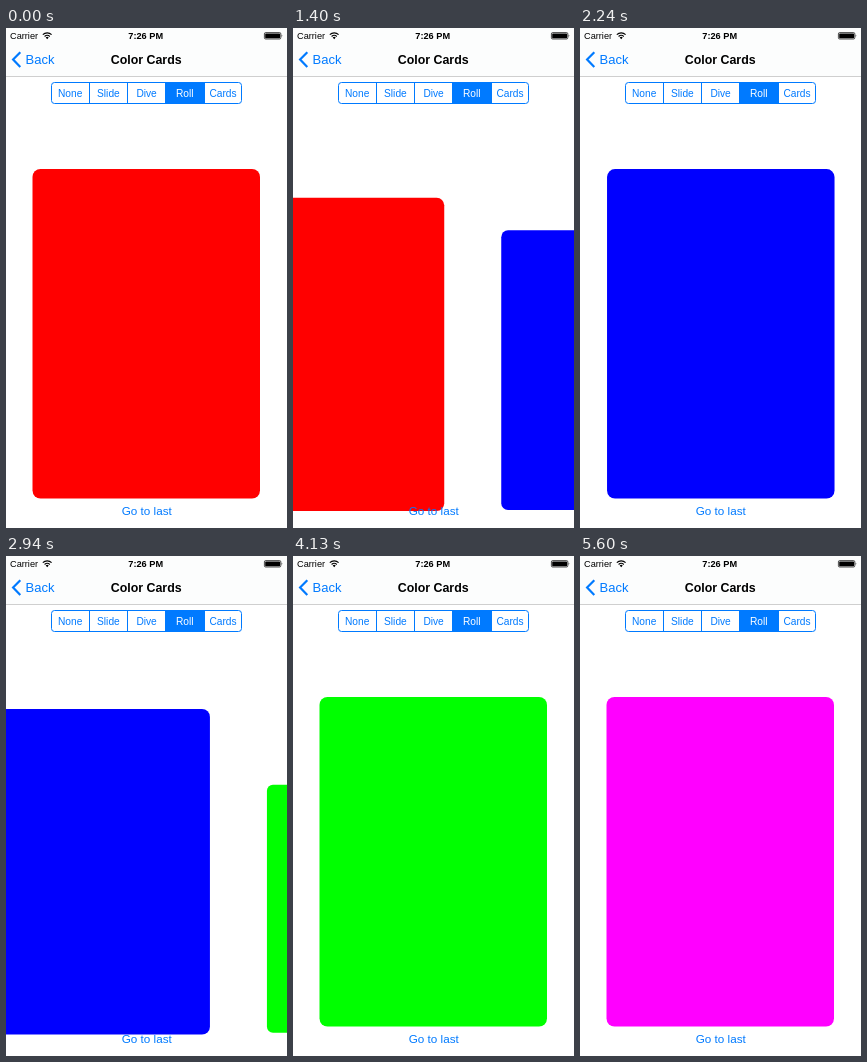
An HTML page for the animation above (6790 ms loop, 281 by 500 pixels).

```html
<!DOCTYPE html>
<html lang="en">
<head>
<meta charset="utf-8">
<title>Color Cards</title>
<style>
  html, body { margin: 0; width: 100%; height: 100%; overflow: hidden; background: #fff; }
  svg { display: block; width: 281px; height: 500px; font-family: "Liberation Sans", Arial, sans-serif; }
  .blue { fill: #007aff; }
  .mid { text-anchor: middle; }
  .bold { font-weight: bold; }
  .line { fill: none; stroke: #007aff; }
</style>
</head>
<body>
<svg viewBox="0 0 281 500">
  <g id="cards"></g>

  <rect width="281" height="48" fill="#fcfdfd"/>
  <rect y="48" width="281" height="1" fill="#cfcfcf"/>
  <text x="4" y="11" font-size="9.2">Carrier</text>
  <g fill="none" stroke="#000" stroke-width="1.1">
    <path d="M36.8 6.7a6.2 6.2 0 0 1 8.8 0M38.6 8.5a3.7 3.7 0 0 1 5.2 0"/>
  </g>
  <path d="M41.2 11.2l-1.5-1.6a2.1 2.1 0 0 1 3 0z"/>
  <text class="mid bold" x="139.7" y="11" font-size="9.2">7:26 PM</text>
  <rect x="258.4" y="4.6" width="16.4" height="6.4" rx="1.2" fill="none" stroke="#000" stroke-width=".7"/>
  <rect x="259.2" y="5.4" width="14.8" height="4.8" rx=".5"/>
  <path d="M275.7 6.6q1.3 1.2 0 2.4z"/>

  <path class="line" d="M14.3 24.2l-7.2 7.4 7.2 7.4" stroke-width="2.2"/>
  <text class="blue" x="19.6" y="36" font-size="13">Back</text>
  <text class="mid bold" x="140.2" y="36" font-size="12.4">Color Cards</text>

  <g id="tabs" class="mid" font-size="10.2">
    <rect class="blue" x="159.5" y="54.5" width="38.5" height="21"/>
    <rect class="line" x="45.5" y="54.5" width="190" height="21" rx="3"/>
    <path class="line" d="M83.5 54.5v21M121.5 54.5v21M159.5 54.5v21M198.5 54.5v21"/>
  </g>
  <text class="blue mid" x="140.8" y="487.2" font-size="11.7">Go to last</text>
</svg>
<script>
const LOOP = 6790, STEP = 70;
const CARD = { x: 26.5, y: 141, w: 227.5, h: 329.5, r: 8 };
const PITCH = 284.5, DROP = 57, TILT = 50 * Math.PI / 180;

function add(parent, tag, attrs) {
  const el = document.createElementNS("http://www.w3.org/2000/svg", tag);
  for (const k in attrs) el.setAttribute(k, attrs[k]);
  return document.getElementById(parent).appendChild(el);
}

["None", "Slide", "Dive", "Roll", "Cards"].forEach((name, i) => {
  const tab = add("tabs", "text", { x: 64.2 + 38.2 * i, y: 68.6, fill: name === "Roll" ? "#fff" : "#007aff" });
  tab.textContent = name;
});

const cards = ["#f00", "#00f", "#0f0", "#f0f"].map(fill => add("cards", "rect", { fill }));

// [time, scroll position in pages, ease-out power of the way there]
const keys = [
  [0, 0], [910, 0], [980, .065], [1750, .608], [1890, .765], [1960, .765], [2310, 1, 3],
  [2730, 1], [2800, 1.06], [2940, 1.176], [3570, 1.759], [3710, 1.759], [4130, 2, 3],
  [4690, 2], [4760, 2.06], [5040, 2.4], [5600, 3, 2.13], [LOOP, 3]
];

function scrollAt(t) {
  const i = keys.findIndex(k => k[0] > t);
  const [t0, p0] = keys[i - 1], [t1, p1, power = 1] = keys[i];
  return p1 - (p1 - p0) * ((t1 - t) / (t1 - t0)) ** power;
}

// Each card shrinks and sinks with its distance; its inner edge moves evenly.
function place(card, d) {
  const far = Math.abs(d), s = far < 1.3 ? Math.cos(TILT * far) : 0;
  const w = CARD.w * s, h = CARD.h * s;
  const inner = CARD.x + PITCH * d;
  const attrs = {
    x: d < 0 ? inner + CARD.w - w : inner,
    y: CARD.y + (CARD.h - h) / 2 + DROP * far,
    width: w, height: h, rx: CARD.r * s
  };
  for (const k in attrs) card.setAttribute(k, attrs[k]);
}

function draw(now) {
  const t = Math.floor(now % LOOP / STEP) * STEP;
  const pos = scrollAt(t);
  cards.forEach((card, i) => place(card, i - pos));
  requestAnimationFrame(() => draw(performance.now()));
}
draw(performance.now());
</script>
</body>
</html>
```
